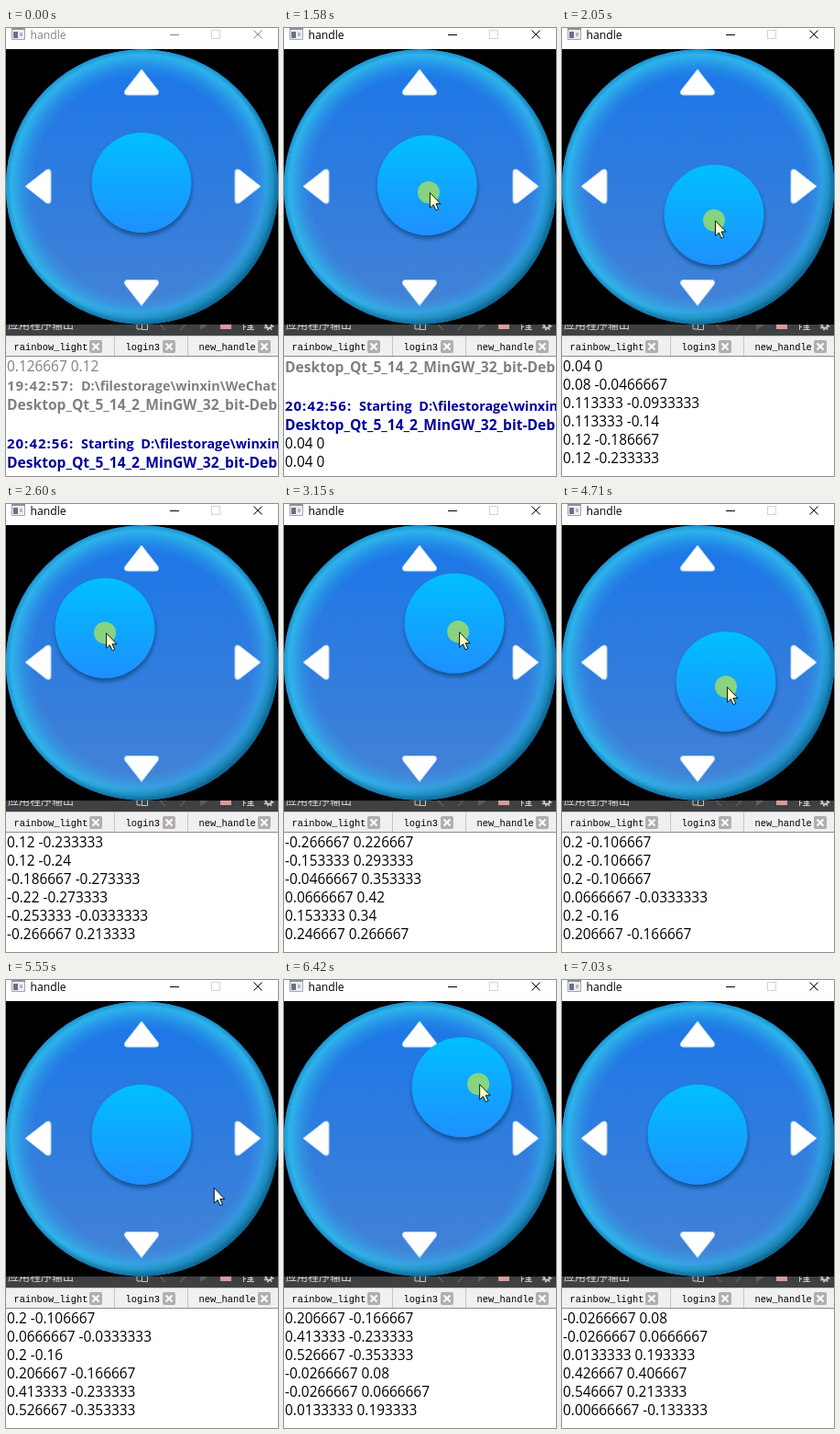
An HTML page for the animation above (7760 ms loop, 297 by 488 pixels).

```html
<!DOCTYPE html>
<html lang="en">
<head>
<meta charset="utf-8">
<title>handle</title>
<style>
html, body { margin: 0; width: 100%; height: 100%; overflow: hidden; background: #fff; }
svg { display: block; }
text { white-space: pre; }
.title { font: 12.2px "Open Sans", sans-serif; }
.tab { font: 10.4px "Liberation Mono", monospace; fill: #000; }
.cjk { font: 12px "Noto Sans CJK SC", "Noto Sans CJK", sans-serif; fill: #d8d8d8; }
.log { font: 15.4px "Open Sans", "Noto Sans", sans-serif; }
.log .bold { font-weight: 700; font-size: 15.6px; }
.log .stamped { font-size: 14.4px; word-spacing: 4px; }
.log .stamp { font-size: 15px; letter-spacing: 1px; }
</style>
</head>
<body>
<svg width="297" height="488" viewBox="0 0 297 488">
  <defs>
    <linearGradient id="face" x1="0" y1="0" x2="0" y2="1">
      <stop offset="0" stop-color="#1a76e8"/>
      <stop offset="1" stop-color="#4583d5"/>
    </linearGradient>
    <radialGradient id="rim">
      <stop offset=".8" stop-color="#2eb6ea" stop-opacity="0"/>
      <stop offset=".87" stop-color="#2eb6ea" stop-opacity=".3"/>
      <stop offset=".96" stop-color="#2eb6ea" stop-opacity=".95"/>
      <stop offset="1" stop-color="#1c92cf"/>
    </radialGradient>
    <radialGradient id="edge" cx=".47" cy=".47" r=".54">
      <stop offset=".9" stop-color="#0a5f8c" stop-opacity="0"/>
      <stop offset="1" stop-color="#0a5f8c" stop-opacity=".9"/>
    </radialGradient>
    <linearGradient id="cap" x1="0" y1="0" x2="0" y2="1">
      <stop offset="0" stop-color="#00bfff"/>
      <stop offset="1" stop-color="#1e90ff"/>
    </linearGradient>
    <filter id="shade" x="-20%" y="-20%" width="140%" height="140%"><feGaussianBlur stdDeviation="2"/></filter>
    <clipPath id="bar"><rect y="323" width="297" height="12"/></clipPath>
    <path id="arrow" d="M148 45 L166 68 Q168 73 163 73 H133 Q128 73 130 68 Z"/>
    <g id="close">
      <rect x="-7" y="-7" width="14" height="14" rx="2" fill="#b3aeae"/>
      <path d="M-3.5 -3.5 L3.5 3.5 M3.5 -3.5 L-3.5 3.5" stroke="#fff" stroke-width="2"/>
    </g>
  </defs>

  <rect width="297" height="488" fill="#fff"/>

  <!-- output panel -->
  <rect y="323" width="297" height="12" fill="#3f4042"/>
  <g clip-path="url(#bar)" fill="none" stroke="#c8c8c8">
    <text class="cjk" x="2" y="328" stroke="none">应用程序输出</text>
    <path d="M143 318 V328 H148 M148.500 322 H154.500 V328.500 H148.500 Z"/>
    <path d="M174 319 L169 324 L174 329 M190 319 L195 324 L190 329" stroke="#5c5d5f" stroke-width="1.500"/>
    <path d="M212 318 L220 324 L212 329 Z" fill="#5c5d5f" stroke="none"/>
    <rect x="234" y="319" width="12" height="9" fill="#d79a9a" stroke="none"/>
    <path d="M259.500 318 V329 M259 325.500 H262 M264 324.500 H270 M264 326.500 H270 M263 328.500 H271 M267.500 320 V329"/>
    <circle cx="287" cy="324" r="3" stroke-width="2"/>
    <circle cx="287" cy="324" r="4.800" stroke-width="1.500" stroke-dasharray="1.900 1.870"/>
  </g>
  <rect y="335" width="297" height="23" fill="#f0f0f0"/>
  <path d="M0 335.500 H297 M118.500 336 V357 M198.500 336 V357" stroke="#c4c4c4"/>
  <path d="M0 357.500 H297" stroke="#8c8c8c"/>
  <text class="tab" x="8.500" y="351">rainbow_light</text>
  <text class="tab" x="130.500" y="351">login3</text>
  <text class="tab" x="210.500" y="351">new_handle</text>
  <use href="#close" x="98" y="347"/>
  <use href="#close" x="178" y="347"/>
  <use href="#close" x="282" y="347"/>
  <g class="log" id="log"></g>

  <!-- title bar -->
  <path d="M6.500 0 V12.500 H20.500 V0" fill="#eceef0" stroke="#a2a6aa"/>
  <rect x="6" y="0" width="15" height="2" fill="#8d9297"/>
  <rect x="8" y="4" width="5" height="7" fill="#66708c"/>
  <rect x="15" y="5" width="3" height="4" fill="#b4b9be"/>
  <g id="chrome">
    <text class="title" x="26.500" y="12" fill="currentColor">handle</text>
    <path d="M179 7.500 H189 M270.500 2.500 L279.500 11.500 M279.500 2.500 L270.500 11.500" stroke="currentColor" fill="none"/>
  </g>
  <rect x="224.500" y="2.500" width="9" height="9" fill="none" stroke="#d4d4d4"/>

  <!-- pad -->
  <rect y="23" width="297" height="300" fill="#000"/>
  <ellipse cx="148.500" cy="173" rx="148.700" ry="149.700" fill="url(#face)"/>
  <ellipse cx="148.500" cy="173" rx="148.700" ry="149.700" fill="url(#rim)"/>
  <ellipse cx="148.500" cy="173" rx="148.700" ry="149.700" fill="url(#edge)"/>
  <g fill="#fff" stroke="#b9d6f7" stroke-linejoin="round">
    <use href="#arrow"/>
    <use href="#arrow" transform="matrix(1 0 0 -1 0 347.500)"/>
    <use href="#arrow" transform="matrix(0 1 1 0 -24 24.500)"/>
    <use href="#arrow" transform="matrix(0 1 -1 0 323 24.500)"/>
  </g>
  <g id="knob">
    <circle cx=".5" cy="3.500" r="54.500" fill="#0d4680" opacity=".8" filter="url(#shade)"/>
    <circle r="54.500" fill="url(#cap)"/>
  </g>

  <g id="mouse">
    <circle id="glow" r="12" fill="#ff0" opacity=".5"/>
    <path id="pointer" d="M1.500 .5 V17 L5.300 13.500 L8 19.500 L10.700 18.300 L8 12.500 H13 Z" stroke="#000" stroke-width=".9"/>
  </g>
</svg>
<script>
const LOOP = 7760, LEAD = 30, STEP = 100, RANGE = 150;
const ENTER = 70, FOCUS = 1310, LEAVE = 7030;
const HOME = { x: 148, y: 168.5 };

// turning points of each drag, relative to the pad centre with y up: x, y, steps taken
const drags = [
  { down: 1340, up: 3820, stops: [
    [6, 0], [6, 0, 2], [17, -14, 2], [18, -35, 3], [18, -36], [-28, -41], [-33, -41], [-38, -5],
    [-40, 32], [-40, 34], [10, 63, 3], [50, 28, 3], [50, 10], [33, -15], [30, -16]
  ] },
  { down: 4400, up: 4770, stops: [[2, 0], [10, -5], [30, -24], [31, -25]] },
  { down: 5330, up: 5545, stops: [[4, 8], [62, -35], [79, -53]] },
  { down: 6050, up: 6700, stops: [[-4, 12], [-4, 12], [-4, 10], [2, 29], [64, 61], [82, 32], [1, -20]] }
];

// steady while dragging, eased glides in between
const path = [{ t: ENTER, x: 142, y: -306 }, { t: 950, x: 6, y: 0, glide: true }];
for (const { down, up, stops } of drags) {
  let t = down;
  stops.forEach(([x, y, steps = 1], i) => {
    if (i) t += steps * STEP;
    path.push({ t, x, y, glide: !i });
  });
  path.push({ ...path[path.length - 1], t: up });
}
path.push({ t: LEAVE, x: 70, y: -312, glide: true });

function at(t) {
  const i = path.findIndex(p => p.t > t);
  if (i < 1) return i ? path[path.length - 1] : path[0];
  const a = path[i - 1], b = path[i];
  let k = (t - a.t) / (b.t - a.t);
  if (b.glide) k *= k * (3 - 2 * k);
  return { x: a.x + (b.x - a.x) * k, y: a.y + (b.y - a.y) * k };
}

const GREY = "#808080", NAVY = "#00009a";
const kit = "Desktop_Qt_5_14_2_MinGW_32_bit-Debug";
const dir = "D:\\filestorage\\winxin\\WeChat";
const plain = (text, t, color = "#000") => ({ t, text, color, h: 20, base: 16, cls: "" });
const bold = (text, color, stamp = "") =>
  ({ t: 0, text, color, stamp, h: 21, base: 17, cls: stamp ? "bold stamped" : "bold" });
const lines = [
  plain("0.126667 0.12", 0, GREY),
  bold(" " + dir, GREY, "19:42:57:"),
  bold(kit, GREY),
  bold("", GREY),
  bold(" Starting " + dir, NAVY, "20:42:56:"),
  bold(kit, NAVY)
];

const show = v => String(Number((Math.round(v) / RANGE).toPrecision(6)));
for (const { down, up } of drags)
  for (let t = down + STEP; t < up; t += STEP) {
    const { x, y } = at(t);
    lines.push(plain(show(x) + " " + show(y), t));
  }

const $ = id => document.getElementById(id);
const log = $("log"), frame = $("chrome"), knob = $("knob");
const mouse = $("mouse"), glow = $("glow"), pointer = $("pointer");

function add(parent, tag, attrs, text = "") {
  const el = document.createElementNS("http://www.w3.org/2000/svg", tag);
  for (const key in attrs) el.setAttribute(key, attrs[key]);
  el.textContent = text;
  return parent.appendChild(el);
}

let printed = -1;
function print(count) {
  if (count === printed) return;
  printed = count;
  log.replaceChildren();
  let y = 358;
  for (const line of lines.slice(count - 6, count)) {
    const row = add(log, "text", { x: 1, y: y + line.base, fill: line.color, class: line.cls });
    if (line.stamp) add(row, "tspan", { class: "stamp" }, line.stamp);
    add(row, "tspan", {}, line.text);
    y += line.h;
  }
}

const move = (el, x, y) => el.setAttribute("transform", `translate(${x} ${y})`);

function draw(t) {
  const held = drags.some(d => t >= d.down && t < d.up);
  const grip = held ? at(t) : { x: 0, y: 0 };
  const tip = at(t + LEAD);
  move(knob, HOME.x + grip.x, HOME.y - grip.y);
  move(mouse, HOME.x + tip.x, HOME.y + 5.5 - tip.y);
  mouse.style.display = t >= ENTER && t < LEAVE ? "" : "none";
  glow.style.display = held ? "" : "none";
  pointer.style.fill = held ? "#ffffc8" : "#fff";
  frame.style.color = t >= FOCUS ? "#000" : "#858585";
  print(lines.filter(line => line.t <= t).length);
}

const start = performance.now();
function tick() {
  draw((performance.now() - start) % LOOP);
  requestAnimationFrame(tick);
}
tick();
</script>
</body>
</html>
```
